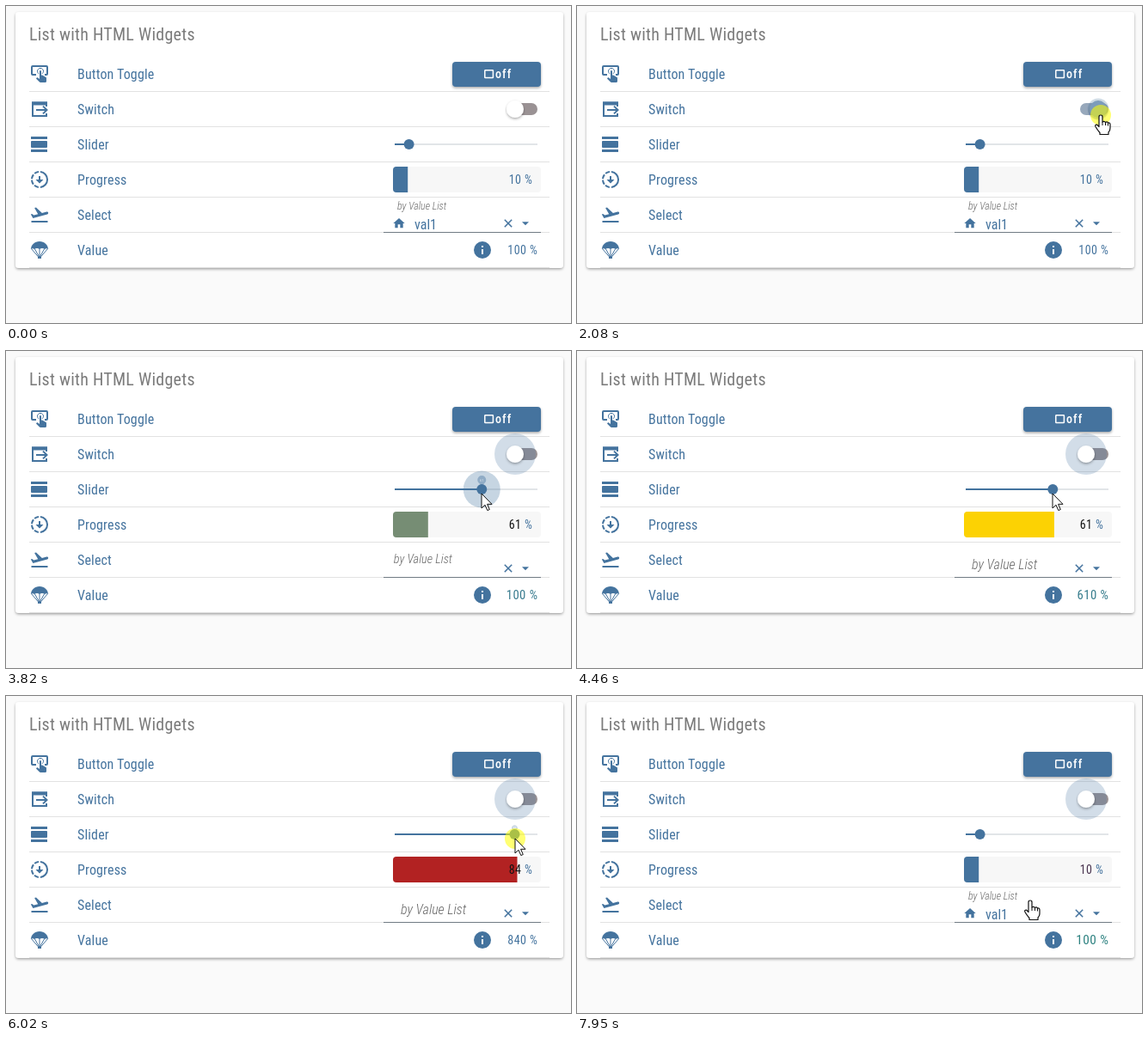
An HTML page that plays this animation: 657 px wide and 369 px high, repeating every 8000 ms.

```html
<!DOCTYPE html>
<html lang="en">
<head>
<meta charset="utf-8">
<title>List with HTML Widgets</title>
<style>
html, body { margin: 0; width: 100%; height: 100%; overflow: hidden; background: #fafafa; }
svg { display: block; width: 657px; height: 369px; }
text { font-family: "Roboto Condensed", Roboto, sans-serif; font-stretch: 75%; white-space: pre; }
</style>
</head>
<body>
<svg id="stage" viewBox="0 0 657 369" xmlns="http://www.w3.org/2000/svg"></svg>
<script>
const LOOP = 8000;
const BLUE = [68, 115, 158], YELLOW = [252, 210, 3], RED = [178, 34, 34], GREEN = [0, 160, 70];
const C = '#44739e';
const stage = document.getElementById('stage');

// Uniform condensing, only when no narrow cut of the font is installed
stage.innerHTML = '<text font-size="16">Button Toggle</text>';
const narrow = stage.firstChild.getComputedTextLength() > 94 ? 0.88 : 1;

const at = (x, y) => `translate(${x} ${y}) scale(${narrow} 1)`;
const label = (x, y, str, size, fill, extra = '') =>
  `<text transform="${at(x, y)}" font-size="${size}" fill="${fill}" ${extra}>${str}</text>`;
const icon = (x, y, body) => `<g transform="translate(${x} ${y})" fill="${C}">${body}</g>`;
const path = (d, extra = '') => `<path d="${d}" ${extra}/>`;
const line = w => `fill="none" stroke="${C}" stroke-width="${w}"`;

const rows = [
  ['Button Toggle',
    path('M8 13H4A1 1 0 0 1 3 12V4A1 1 0 0 1 4 3H20A1 1 0 0 1 21 4V12A1 1 0 0 1 20 13H18', line(2)) +
    path('M11 11.8A3.5 3.5 0 1 1 15 11.8', line(1)) +
    path('M12 18V9A1 1 0 0 1 14 9V13.5L15.2 13.6L19.2 15.8Q20 16.2 20 17.1V20.5Q20 22 18.5 22H13Q12.4 22 12 21.6L8 17.4L8.7 16.6Q9.2 16.2 9.7 16.3Z')],
  ['Switch',
    path('M20 9V4.5H4V20H20V17', line(2)) + path('M3 3.5H21V7.5H3Z') +
    path('M8 13H20M16 8.6L20.5 13L16 17.4', line(2))],
  ['Slider',
    path('M2 3V6H21V3M20 8H3A1 1 0 0 0 2 9V15A1 1 0 0 0 3 16H20A1 1 0 0 0 21 15V9A1 1 0 0 0 20 8M2 21H21V18H2Z')],
  ['Progress',
    path('M13 3.05A9 9 0 0 1 13 20.95', line(2)) +
    path('M11 3.05A9 9 0 0 0 11 20.95', line(2) + ' stroke-dasharray="5.3 1.6"') +
    path('M12 16.5L7.5 12H11V8H13V12H16.5Z')],
  ['Select',
    path('M2.5 19H21.5V21H2.5ZM22.1 9.6C21.9 8.8 21 8.4 20.2 8.6L14.9 10L8 3.6L6.1 4.1L10.2 11.2L5.3 12.6L3.3 11L1.8 11.4L4.4 15.9L21 11.5C21.8 11.3 22.3 10.4 22.1 9.6Z')],
  ['Value',
    path('M2 11C2 6 6.5 2 12 2S22 6 22 11Q20 9.4 18 11Q15 9.2 12 11Q9 9.2 6 11Q4 9.4 2 11Z') +
    path('M2.4 10.5L11.5 21M21.6 10.5L12.5 21M6.2 10.5L12 20.5L17.8 10.5M12 10.5V21', line(1)) +
    path('M10 19.5H14V22H10Z')]
];

const list = rows.map(([name, art], i) => {
  const y = 79 + 41 * i;
  return icon(27, y - 12, art) +
    label(83, y + 6, name, 16, C, 'letter-spacing=".15"') +
    `<rect x="27" y="${y + 20}" width="605" height="1" fill="#e2e2e2"/>`;
}).join('');

stage.innerHTML = `
<defs>
  <filter id="soft" x="-10%" y="-30%" width="120%" height="170%">
    <feDropShadow dx="0" dy="1.5" stdDeviation="1.5" flood-opacity=".35"/>
  </filter>
  <clipPath id="barClip"><rect x="450" y="187" width="172" height="30" rx="4"/></clipPath>
</defs>
<rect width="657" height="369" fill="#fafafa"/>
<rect x="11" y="7" width="637" height="298" rx="4" fill="#fff" filter="url(#soft)"/>
${label(27, 40, 'List with HTML Widgets', 20, '#7b7b7b', 'letter-spacing=".25"')}
${list}

<rect id="button" x="519" y="65" width="103" height="29" rx="4" filter="url(#soft)"/>
<g id="boxOff"><rect x="556.8" y="74.8" width="9.6" height="8.8" rx=".6" fill="none" stroke="#fff" stroke-width="1.5"/></g>
<g id="boxOn"><rect x="557" y="73.5" width="11" height="10.5" rx="1" fill="#fff"/>
  <path d="M559 79L561.5 81.5L566 76.5" fill="none" stroke="#168a16" stroke-width="1.4"/></g>
${label(569, 84, 'off', 14, '#fff', 'id="state" letter-spacing="1.1" font-weight="500"')}

<rect id="rail" x="585" y="113" width="33" height="14" rx="7"/>
<circle id="halo" cy="120" fill="${C}" fill-opacity=".24"/>
<circle id="knob" cy="120" r="10" filter="url(#soft)"/>

<rect x="452" y="160" width="166" height="2" fill="#e2e5e8"/>
<rect id="fill" x="452" y="160" height="2" fill="${C}"/>
<circle id="press" cy="161" fill="${C}" fill-opacity=".3"/>
<circle id="thumb" cy="161" r="6" fill="${C}"/>
<g id="pin">
  <path d="M0 -12.4L-11.3 -23.7A16 16 0 1 1 11.3 -23.7Z" fill="${C}"/>
  <text id="pinText" font-size="14" fill="#fff" text-anchor="middle" transform="${at(0, -30)}"></text>
</g>

<g clip-path="url(#barClip)">
  <rect x="450" y="187" width="172" height="30" fill="#f7f7f7"/>
  <rect id="bar" x="450" y="187" height="30"/>
</g>
<text transform="${at(612.4, 207)}" font-size="14" letter-spacing=".45" text-anchor="end" fill="${C}"><tspan id="percent"></tspan> %</text>

<rect x="439" y="263" width="183" height="1" fill="#717b84"/>
<text id="hint" font-style="italic" font-weight="300" fill="#666">by Value List</text>
<g id="choice">
  <path transform="translate(449 245) scale(.667)" d="M10 20V14H14V20H19V12H22L12 3L2 12H5V20Z" fill="${C}"/>
  ${label(475, 260, 'val1', 16, C)}
</g>
<path d="M579.8 248.8L588.2 257.2M588.2 248.8L579.8 257.2" ${line(1.5)}/>
<path d="M600 251.3H608L604 255.3Z" fill="${C}"/>

<circle cx="554" cy="284" r="10" fill="${C}"/>
<path d="M553 283H555V289H553ZM553 279H555V281H553Z" fill="#fff"/>
<text id="value" transform="${at(618.4, 289)}" text-anchor="end" letter-spacing=".45"></text>

<circle id="click" r="12" fill="#ff0" fill-opacity=".55"/>
<g id="cursor" fill="#fff" stroke="#111" stroke-linejoin="round">
  <path id="arrow" d="M0 0V17L4 13.2L6.8 19.6L9.3 18.5L6.6 12.3H12Z"/>
  <g id="hand">
    <path stroke-width="1.2" d="M-2 2Q-2 0 0 0T2 2V8Q4 6.5 5.5 8.5Q7.5 7 8.5 9Q11 8.5 11 11V15Q11 18 9 20V22.5H-1V20.5Q-4 17 -6 13.5Q-7 11 -4.5 11L-2 13.5Z"/>
    <path fill="none" d="M2 8V12M5.5 8.5V12M8.5 9V12.5"/>
  </g>
</g>`;

const el = {};
stage.querySelectorAll('[id]').forEach(n => el[n.id] = n);
const set = (id, attrs) => { for (const k in attrs) el[id].setAttribute(k, attrs[k]); };
const show = (id, on) => set(id, { visibility: on ? 'visible' : 'hidden' });
const write = (id, str) => { if (el[id].textContent !== str) el[id].textContent = str; };

const clamp = v => Math.min(1, Math.max(0, v));
const mix = (a, b, p) => a + (b - a) * p;
const rgb = (a, b, p) => `rgb(${a.map((v, i) => Math.round(mix(v, b[i], p)))})`;
const bezier = (x1, y1, x2, y2) => x => {
  const curve = (a, b, u) => 3 * a * u * (1 - u) ** 2 + 3 * b * u * u * (1 - u) + u ** 3;
  let lo = 0, hi = 1;
  if (x <= 0 || x >= 1) return clamp(x);
  for (let i = 0; i < 18; i++) {
    const m = (lo + hi) / 2;
    if (curve(x1, x2, m) < x) lo = m; else hi = m;
  }
  return curve(y1, y2, lo);
};
const swift = bezier(.25, .8, .5, 1);
const inOut = bezier(.4, 0, .6, 1);
const ramp = (t, start, dur, ease = swift) => ease(clamp((t - start) / dur));

// Keys are [time, ...values], eased between neighbours
function track(keys, t) {
  let i = 0;
  while (i < keys.length - 2 && t >= keys[i + 1][0]) i++;
  const a = keys[i], b = keys[i + 1];
  const p = clamp((t - a[0]) / (b[0] - a[0]));
  const s = p * p * (3 - 2 * p);
  return a.slice(1).map((v, k) => mix(v, b[k + 1], s));
}

const mouse = [
  [150, 578, 366], [560, 562, 50], [790, 567, 76], [1300, 567, 76], [1680, 600, 127],
  [1770, 600, 127], [1920, 609, 127], [2180, 609, 127], [2500, 545, 187], [2850, 486, 168],
  [2990, 478, 167], [3670, 553, 166], [4600, 553, 166], [4920, 592, 166], [6020, 592, 166],
  [6430, 472, 166], [6590, 471, 166], [6900, 470, 166], [7350, 470, 166], [7900, 527, 238]
];
const level = [[2910, 10], [3000, 15], [3670, 61], [4600, 61], [4920, 84],
  [6020, 84], [6430, 12], [6590, 11], [6900, 10]];
const holds = [[2940, 3735], [4570, 5100], [6000, 7290]];
const clicks = [[940, 1040], [2020, 2120], ...holds];
const updates = [
  { start: 3750, from: 10, to: 61, a: BLUE, b: YELLOW },
  { start: 5130, from: 61, to: 84, a: YELLOW, b: RED },
  { start: 7290, from: 84, to: 10, a: RED, b: BLUE }
];
const EFFECT = 790;

const held = (t, ease) => Math.max(...holds.map(([a, b]) =>
  ramp(t, a, 300, ease) * (1 - ramp(t, b, 280, ease))));

function drawSwitch(t) {
  const on = t >= 960 && t < 2050;
  set('button', { fill: on ? '#168a16' : C });
  show('boxOn', on);
  show('boxOff', !on);
  write('state', on ? 'on' : 'off');

  const p = ramp(t, 980, 300) - ramp(t, 2050, 300);
  const x = mix(592, 612, p);
  set('rail', { fill: rgb([154, 146, 148], [150, 177, 203], p) });
  set('knob', { cx: x, fill: rgb([255, 255, 255], BLUE, p) });
  set('halo', { cx: x, r: 24 * ramp(t, 2030, 250) });
}

function drawSlider(t) {
  const [v] = track(level, t);
  const x = 452 + 1.66 * v;
  const s = held(t, swift), r = held(t, inOut);
  set('fill', { width: x - 452 });
  set('thumb', { cx: x });
  set('press', { cx: x, r: 27 * r });
  set('pin', { transform: `translate(${x} 161) scale(${s})`, opacity: clamp(s * 1.3) });
  write('pinText', String(Math.round(v)));
}

function drawValues(t) {
  const u = updates.filter(k => t >= k.start).pop();
  const bar = u ? ramp(t, u.start, 200, inOut) : 0;
  const shown = u ? mix(u.from, u.to, bar) : 10;
  set('bar', { width: 1.72 * shown, fill: u ? rgb(u.a, u.b, bar) : C });
  write('percent', String(u ? u.to : 10));
  set('percent', { fill: !u ? C : u.to === 10 ? '#4a3550' : '#151515' });

  const q = u ? clamp((t - u.start) / EFFECT) : 0;
  const glow = 1 - Math.abs(2 * q - 1);
  write('value', `${(u ? (q < .5 ? u.from : u.to) : 10) * 10} %`);
  set('value', { 'font-size': 14 + 4 * glow, fill: rgb(BLUE, GREEN, glow) });
}

function drawSelect(t) {
  const empty = t >= 3750 && t < 7290;
  const p = empty ? ramp(t, 3750, 300) : t < 3750 ? 0 : 1 - ramp(t, 7290, 300);
  const x = mix(empty ? 439.5 : 455, 459, p);
  show('choice', !empty);
  set('hint', { transform: at(x, mix(237, 254, p)), 'font-size': mix(12, 16, p) });
}

function drawMouse(t) {
  const [x, y] = track(mouse, t);
  const hand = (t > 500 && t < 2250) || t > 7780;
  const seen = t >= 150;
  show('arrow', seen && !hand);
  show('hand', seen && hand);
  set('cursor', { transform: `translate(${x} ${y})` });
  set('click', { cx: x, cy: y });
  show('click', clicks.some(([a, b]) => t >= a && t < b));
}

function draw(t) {
  drawSwitch(t);
  drawSlider(t);
  drawValues(t);
  drawSelect(t);
  drawMouse(t);
}

const begin = performance.now();
function tick() {
  draw((performance.now() - begin) % LOOP);
  requestAnimationFrame(tick);
}
tick();
</script>
</body>
</html>
```
